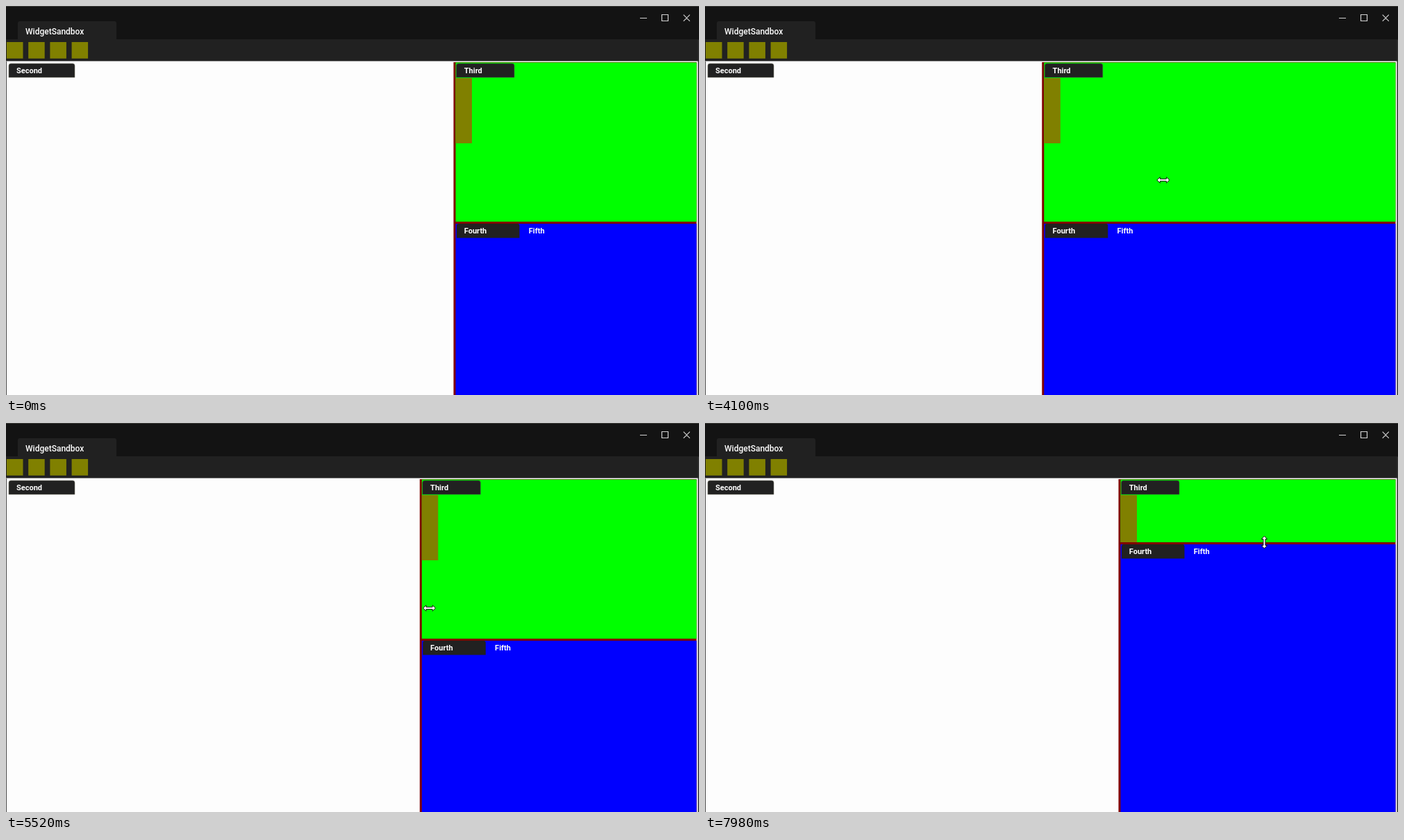
Recreate the animation shown at these times as an HTML page. Size 998 by 561 pixels, loop 8 s.

```html
<!DOCTYPE html>
<html lang="en">
<head>
<meta charset="utf-8">
<title>Docking panels</title>
<style>
  html, body { margin: 0; width: 100%; height: 100%; overflow: hidden; background: #131313; }
  svg { display: block; width: 998px; height: 561px; }
  text { font: 700 11px Roboto, Arial, sans-serif; fill: #fff; }
  .title { font-weight: 500; font-size: 12px; }
  .tab { fill: #212121; }
  .olive { fill: #808000; }
  .icon { fill: none; stroke: #d0d0d0; stroke-width: 1.2; }
  .pointer { fill: #fff; stroke: #111; stroke-width: 1; stroke-linejoin: round; }
</style>
</head>
<body>
<svg viewBox="0 0 998 561">
  <defs>
    <path id="arrow" d="M.5 .5V12.2L3.2 9.7L5.1 14L7.1 13.1L5.2 9H9Z"/>
    <path id="resize" d="M-9 0L-4.5 -4.2V-1.5H4.5V-4.2L9 0L4.5 4.2V1.5H-4.5V4.2Z"/>
  </defs>

  <rect width="998" height="561" fill="#131313"/>
  <rect width="998" height="1" fill="#3c3c38"/>
  <path class="tab" d="M17 48V25Q17 22 20 22H156Q159 22 159 25V48Z"/>
  <rect class="tab" y="48" width="998" height="32"/>
  <text class="title" x="28" y="41">WidgetSandbox</text>
  <path class="icon" d="M913 17.5H923M944.5 12.5H953.5V21.5H944.5ZM975.7 12.7L984.8 21.8M984.8 12.7L975.7 21.8"/>
  <g id="tools" class="olive"></g>

  <rect y="79.5" width="997" height="482" fill="#fdfdfd"/>
  <rect y="80" width="1" height="481" fill="#4a4a4a"/>
  <rect x="996.5" y="49" width="1.5" height="512" fill="#303030"/>
  <path class="tab" stroke="#77776a" stroke-width=".6" d="M4 103V86Q4 83 7 83H96Q99 83 99 86V103Z"/>
  <text x="15" y="97">Second</text>

  <rect id="split" y="81" height="480" fill="#800000"/>
  <rect id="green" y="81.5" fill="#0f0"/>
  <rect id="blue" fill="#00f"/>
  <g id="third">
    <rect id="strip" class="olive" y="104" width="23.5"/>
    <path class="tab" stroke="#3c6a3c" stroke-width=".6" d="M1 103V86Q1 83 4 83H81.5Q84.5 83 84.5 86V103Z"/>
    <text x="12.3" y="97">Third</text>
  </g>
  <g id="lower">
    <path class="tab" d="M1.5 23.5V6Q1.5 3 4.5 3H89Q92 3 92 6V23.5Z"/>
    <text x="12.3" y="17">Fourth</text>
    <text x="105.3" y="17">Fifth</text>
  </g>
  <use id="pointer" class="pointer"/>
</svg>
<script>
const LOOP = 8000, LAG = 100, RIGHT = 994.5;
const $ = id => document.getElementById(id);
const set = (id, attrs) => {
  for (const k in attrs) $(id).setAttribute(k, attrs[k]);
};

// Pointer path: time, x, y
const path = [
  [0, 470, -24], [350, 496, 150], [750, 520, 270], [1200, 548, 300],
  [1600, 556, 230], [1880, 549, 193], [2300, 590, 215], [2800, 636, 240],
  [3150, 646, 247], [3280, 630.5, 248], [3380, 613, 248], [3640, 450, 250],
  [3820, 400, 250], [4000, 486, 250], [4100, 659, 251], [4260, 750, 254],
  [4460, 620, 259], [4630, 480, 263], [4720, 508.5, 264], [4820, 588, 265],
  [5000, 690, 266], [5260, 560, 267], [5500, 610, 267], [5700, 597, 267],
  [5850, 597, 267], [6350, 780, 300], [6560, 800, 311], [6740, 800, 311],
  [7100, 803, 270], [7500, 805, 205], [7820, 805.5, 172], [8000, 805.5, 172]
];

const slope = (i, c) => (path[i + 1][c] - path[i][c]) / (path[i + 1][0] - path[i][0]);

// Flat at turning points, smooth elsewhere
function tangent(i, c) {
  if (i === 0 || i === path.length - 1) return 0;
  const a = slope(i - 1, c), b = slope(i, c);
  return a * b > 0 ? 2 * a * b / (a + b) : 0;
}

function at(t, c) {
  let i = 0;
  while (i < path.length - 2 && t >= path[i + 1][0]) i++;
  const a = path[i], b = path[i + 1], h = b[0] - a[0], u = (t - a[0]) / h;
  const w = u * u * (3 - 2 * u);
  return a[c] * (1 - w) + b[c] * w
    + h * u * (1 - u) * ((1 - u) * tangent(i, c) - u * tangent(i + 1, c));
}

const clamp = (v, lo, hi) => Math.min(hi, Math.max(lo, v));

function render(t) {
  // The panes trail the pointer while it drags a divider
  const left = at(clamp(t - LAG, 3150, 5700), 1) + 1.5;
  const bottom = at(clamp(t - LAG, 6740, 8000), 2);
  const width = RIGHT - left;

  set("split", { x: left - 3, width: width + 3 });
  set("green", { x: left, width, height: bottom - 81.5 });
  set("blue", { x: left, y: bottom + 3, width, height: 558 - bottom });
  set("third", { transform: `translate(${left})` });
  set("strip", { height: clamp(bottom - 104, 0, 94) });
  set("lower", { transform: `translate(${left} ${bottom})` });

  const sideways = t >= 3080 && t < 5880, upright = t >= 6530;
  set("pointer", {
    href: sideways || upright ? "#resize" : "#arrow",
    transform: `translate(${at(t, 1)} ${at(t, 2)})` + (upright ? " rotate(90)" : "")
  });
}

$("tools").innerHTML = [0, 1, 2, 3]
  .map(i => `<rect x="${1 + i * 31.2}" y="52" width="23.5" height="23.7"/>`).join("");

const start = performance.now();
function tick() {
  render((performance.now() - start) % LOOP);
  requestAnimationFrame(tick);
}
render(0);
requestAnimationFrame(tick);
</script>
</body>
</html>
```
